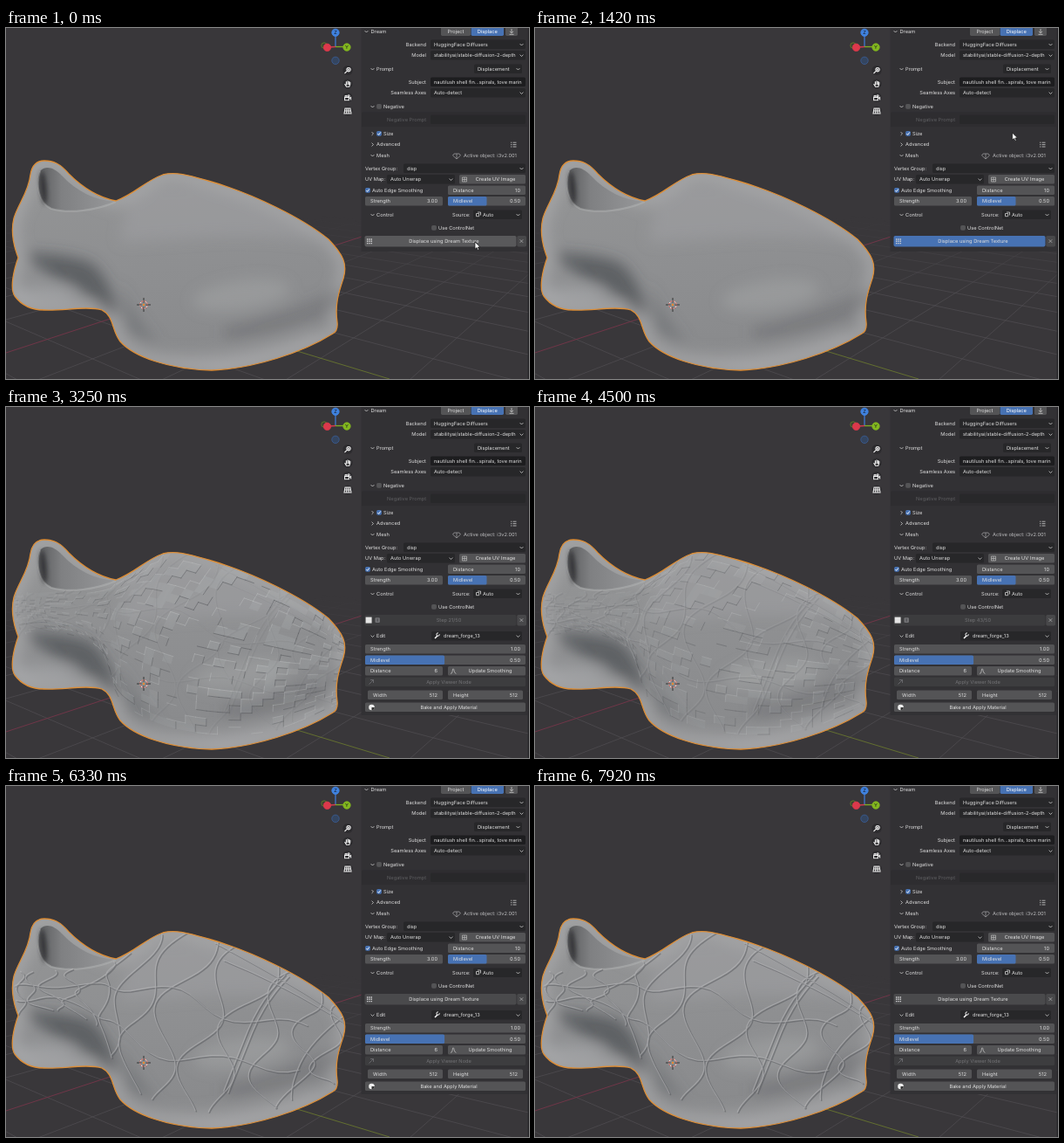
Animation of 600x402 px, one loop 8000 ms. Source, as an HTML page:

```html
<!DOCTYPE html>
<html lang="en">
<head>
<meta charset="utf-8">
<title>Displacement preview</title>
<style>
html, body { margin: 0; width: 100%; height: 100%; overflow: hidden; background: #39373a; }
svg { display: block; width: 600px; height: 402px; }
text { font: 5.7px Inter, "Noto Sans", sans-serif; text-rendering: geometricPrecision; white-space: pre; }
</style>
</head>
<body>
<svg id="stage" viewBox="0 0 600 402" xmlns="http://www.w3.org/2000/svg">
  <defs>
    <linearGradient id="skin" x1=".4" y1="0" x2=".6" y2="1">
      <stop offset="0" stop-color="#939495"/><stop offset=".5" stop-color="#8e8f91"/>
      <stop offset="1" stop-color="#88898b"/>
    </linearGradient>
    <linearGradient id="inside">
      <stop offset="0" stop-color="#58595b"/><stop offset=".3" stop-color="#7f8082"/>
      <stop offset="1" stop-color="#97989a"/>
    </linearGradient>
    <linearGradient id="fog" gradientUnits="userSpaceOnUse" x1="0" y1="215" x2="0" y2="310">
      <stop offset="0" stop-color="#fff" stop-opacity="0"/><stop offset="1" stop-color="#fff"/>
    </linearGradient>
    <radialGradient id="spot" gradientUnits="userSpaceOnUse" cx="265" cy="255" r="270">
      <stop offset=".25" stop-color="#fff"/><stop offset=".5" stop-color="#aaa"/>
      <stop offset="1" stop-color="#555"/>
    </radialGradient>
    <filter id="b3" x="-50%" y="-50%" width="200%" height="200%"><feGaussianBlur stdDeviation="2.5"/></filter>
    <filter id="b8" x="-60%" y="-60%" width="220%" height="220%"><feGaussianBlur stdDeviation="8"/></filter>
    <mask id="fade" maskUnits="userSpaceOnUse" x="0" y="0" width="600" height="402"><rect width="600" height="402" fill="url(#fog)"/></mask>
    <mask id="focus" maskUnits="userSpaceOnUse" x="0" y="0" width="600" height="402"><rect width="600" height="402" fill="url(#spot)"/></mask>
    <path id="shape" d="M44,152C36,152 30,156 28,168C26,188 13,203 9,218C5,234 9,250 14,263C9,277 4,298 10,307C18,318 30,323 44,323C66,324 94,318 110,323C124,330 121,346 131,359C146,376 186,391 236,392C284,390 340,372 375,350Q381,347 380,337C377,316 382,302 387,287C392,270 387,260 370,242C342,219 285,190 232,175C211,169 195,164 180,168C160,175 148,190 126,198C105,194 88,183 72,167C62,155 54,152 44,152Z"/>
    <clipPath id="cut"><use href="#shape"/></clipPath>
    <path id="veins" fill="none"/>
  </defs>

  <rect width="600" height="402" fill="#39373a"/>
  <g mask="url(#fade)"><path id="grid" stroke="#525053" stroke-width=".7" fill="none"/></g>
  <path d="M0,372L408,239" stroke="#76364a" stroke-width=".9"/>
  <path d="M158,317L440,402" stroke="#68752f" stroke-width=".9"/>

  <use href="#shape" fill="url(#skin)"/>
  <g clip-path="url(#cut)">
    <g filter="url(#b8)">
      <use href="#shape" fill="none" stroke="#b4b5b6" stroke-width="13" opacity=".6"/>
      <path d="M18,258Q60,256 96,268Q120,284 128,332L110,322Q92,300 52,284Z" fill="#3f4043" opacity=".6"/>
      <path d="M140,196Q190,160 270,195T360,245Q290,235 220,240T130,245Z" fill="#a5a6a8" opacity=".4"/>
      <ellipse cx="270" cy="306" rx="56" ry="17" fill="#b0b1b3" opacity=".35" transform="rotate(-8 270 306)"/>
      <path d="M250,342Q330,325 388,296V318Q330,350 250,358Z" fill="#55575a" opacity=".3"/>
      <path d="M130,290Q145,330 176,362L140,350Z" fill="#5a5c5f" opacity=".4"/>
      <path d="M150,368Q240,384 350,348L376,352L250,396Z" fill="#b6b7b8" opacity=".4"/>
      <ellipse cx="42" cy="306" rx="40" ry="9" fill="#b0b1b2" opacity=".55"/>
    </g>
    <path d="M40,163C46,157 56,160 64,169C82,188 102,197 126,199C104,209 72,213 52,207C36,200 33,172 40,163Z" fill="url(#inside)"/>
    <path d="M39,164C34,180 37,200 52,207C72,213 104,209 126,199" fill="none" stroke="#b1b2b3" stroke-width="2" opacity=".55"/>
    <ellipse cx="43" cy="183" rx="3.6" ry="19" fill="#353639" filter="url(#b3)" transform="rotate(-5 43 183)"/>
    <g id="bricks" mask="url(#focus)" stroke-linecap="square">
      <path id="faces" fill="#d9dbdc" opacity=".13"/>
      <path id="dark" fill="none" stroke="#44464a" stroke-width="1" opacity=".5"/>
      <path id="light" fill="none" stroke="#d5d7d8" stroke-width=".9" opacity=".4"/>
    </g>
    <g id="leather">
      <use href="#veins" stroke="#4e5054" stroke-width="1.5" opacity=".45" x=".8" y=".9"/>
      <use href="#veins" stroke="#bdbebf" stroke-width="1.1" opacity=".5" x="-.5" y="-.4"/>
    </g>
  </g>
  <use href="#shape" fill="none" stroke="#dc8d36" stroke-width="1.3"/>

  <g fill="none" transform="translate(158 317)">
    <circle r="4.3" stroke="#eee" stroke-width="1"/>
    <circle r="4.3" stroke="#d3392f" stroke-width="1" stroke-dasharray="1.7 1.7"/>
    <path d="M-8,0H-2.5M2.5,0H8M0,-8V-2.5M0,2.5V8" stroke="#2b2b2b" stroke-width=".9"/>
    <circle r="1.2" fill="#ee8b2d"/>
  </g>

  <g id="gizmo"></g>
  <g id="panel"></g>
  <path id="pointer" d="M0,0V8.2L2,6.5L3.4,9.4L4.7,8.8L3.4,6L6,5.8Z" fill="#fff" stroke="#111" stroke-width=".7"/>
</svg>
<script>
const $ = id => document.getElementById(id);
const TEXT = '#dedede', DIM = '#727275', FIELD = '#545456', MENU = '#272729', BLUE = '#4772b3', DEEP = '#1d1d1f';

// Floor grid: two bundles of lines through their vanishing points
const O = [158, 318], VX = [788, 115], VY = [-515, 115];
const along = (v, s) => O.map((o, k) => o + (v[k] - o) * s / (s + 13));
function bundle(base, vanish) {
  let d = '';
  for (let i = -11; i < 60; i++) {
    if (!i) continue;
    const p = along(base, i), q = p.map((c, k) => c + (c - vanish[k]) * 8);
    d += `M${vanish}L${q}`;
  }
  return d;
}
$('grid').setAttribute('d', bundle(VY, VX) + bundle(VX, VY));

// Surface patch spanned between an upper and a lower curve
const UPPER = [[8, 212], [48, 212], [122, 202], [190, 167], [268, 185], [336, 216], [389, 260]];
const LOWER = [[14, 262], [62, 258], [110, 280], [134, 338], [202, 370], [298, 372], [380, 340]];
function spline(pts, u) {
  const n = pts.length - 1, x = Math.min(u * n, n - 1e-6), i = Math.floor(x), f = x - i;
  const at = k => pts[Math.max(0, Math.min(n, k))];
  return [0, 1].map(c => {
    const [a, b, e, g] = [at(i - 1)[c], at(i)[c], at(i + 1)[c], at(i + 2)[c]];
    return b + f / 2 * (e - a + f * (2 * a - 5 * b + 4 * e - g + f * (3 * (b - e) + g - a)));
  });
}
function surface(u, v) {
  u = Math.max(0, Math.min(1, u));
  const a = spline(UPPER, u), b = spline(LOWER, u);
  const bulge = 24 * Math.sin(Math.PI * v) * Math.sin(Math.PI * u);
  return [a[0] + (b[0] - a[0]) * v - bulge, a[1] + (b[1] - a[1]) * v].map(c => c.toFixed(1));
}
const NU = 46, NV = 21, nodes = [];
for (let i = 0; i <= NU; i++) {
  nodes.push([]);
  for (let j = 0; j <= NV; j++) nodes[i].push(surface(i / NU, j / NV));
}
const hash = (a, b) => {
  const s = Math.sin(a * 127.1 + b * 311.7) * 43758.5453;
  return s - Math.floor(s);
};
function height(i, j, step) {
  const r = hash((i + j) >> 1, j >> (i & 4 ? 1 : 0));
  return r + .18 * Math.sin(step * .16 + 20 * hash(j, i));
}
function drawBricks(step) {
  const out = { faces: '', dark: '', light: '' };
  const edge = (d, a, b) => {
    if (Math.abs(d) > .4) out[d > 0 ? 'dark' : 'light'] += `M${a}L${b}`;
  };
  for (let i = 0; i < NU; i++) for (let j = 0; j < NV; j++) {
    const h = height(i, j, step), n = nodes;
    if (h > .75) out.faces += `M${n[i][j]}L${n[i + 1][j]}L${n[i + 1][j + 1]}L${n[i][j + 1]}Z`;
    edge(h - height(i + 1, j, step), n[i + 1][j], n[i + 1][j + 1]);
    edge(h - height(i, j + 1, step), n[i][j + 1], n[i + 1][j + 1]);
  }
  for (const k in out) $(k).setAttribute('d', out[k]);
}

// Leather: neighbouring waves in opposite phase enclose leaf-shaped scales
const trace = f => 'M' + Array.from({ length: 41 }, (_, k) => f(k / 40)).join('L');
let veins = 'M321,216Q292,245 278,280T250,350M325,218Q297,247 283,282T255,352' +
  'M240,180Q300,212 340,236T388,272M250,200Q320,228 386,270M387,264Q350,292 338,318T328,360';
for (let i = 0; i < 14; i++) {
  const mid = .04 + i * .071, phase = i + .25 * hash(i, 3);
  veins += trace(v => surface(mid + .031 * Math.sin(Math.PI * (v * 3.2 + phase)) + .012 * Math.sin(v * 5 + i * 2), v));
}
for (const row of [.36, .68])
  veins += trace(u => surface(u * .9, row + .05 * Math.sin(u * 21 + row * 9)));
$('veins').setAttribute('d', veins);

// Interface pieces
const text = (x, y, s, anchor = 'start', fill = TEXT) =>
  `<text x="${x}" y="${y + 1.95}" text-anchor="${anchor}" fill="${fill}">${s}</text>`;
const box = (x, x2, y, fill, h = 10.6) =>
  `<rect x="${x}" y="${y - h / 2 - .2}" width="${x2 - x}" height="${h}" rx="1.6" fill="${fill}"/>`;
const line = (d, c = '#d0d0d0', w = .8) => `<path d="${d}" fill="none" stroke="${c}" stroke-width="${w}"/>`;
const down = (x, y) => line(`M${x - 1.9},${y - .9}l1.9,1.9l1.9,-1.9`);
const right = (x, y) => line(`M${x - .9},${y - 1.9}l1.9,1.9l-1.9,1.9`);
const menu = (x, x2, y, s, tx = x + 4) => box(x, x2, y, MENU) + text(tx, y, s) + down(x2 - 4.5, y);
const value = (x, x2, y, name, v, part = 0) => box(x, x2, y, FIELD) +
  (part ? box(x, x + (x2 - x) * part, y, BLUE) : '') +
  text(x + 6, y, name) + text(x2 - 6, y, v, 'end');
const button = (x, x2, y, s, fill = FIELD, c = TEXT, tx = (x + x2) / 2) => box(x, x2, y, fill) + text(tx, y, s, 'middle', c);
const check = (x, y, on) => box(x - 2.9, x + 2.9, y, on ? BLUE : FIELD, 5.8) +
  (on ? line(`M${x - 1.6},${y}l1.2,1.4l2.2,-3`, '#fff', .9) : '');
const head = (y, s, open = true) => (open ? down : right)(420.5, y) + text(425, y, s);
const dots = (x, y, c) => {
  let d = '';
  for (let i = 0; i < 9; i++) d += `M${x - 3 + i % 3 * 2.3},${y - 2.6 + Math.floor(i / 3) * 2.3}h1.4`;
  return line(d, c, 1.4);
};

$('panel').innerHTML = `
<rect id="back" x="407.5" width="191" fill="#323134"/><path d="M599.3,0V402" stroke="#242426" stroke-width="1.2"/>` +
  down(413.5, 4) + text(418.5, 4, 'Dream') +
  button(499, 533, 3.8, 'Project') + button(533.6, 571, 3.8, 'Displace', BLUE, '#fff') +
  box(573, 587, 3.8, FIELD) + line('M580,1v4.5M578,3.8l2,2l2,-2M577.5,7.3h5') +
  text(482, 19, 'Backend', 'end') + menu(487, 596, 19, 'HuggingFace Diffusers') +
  text(482, 31.5, 'Model', 'end') + menu(487, 596, 31.5, 'stabilityai/stable-diffusion-2-depth') +
  head(47, 'Prompt') + menu(537, 592, 47, 'Displacement') +
  text(482, 62, 'Subject', 'end') + box(487, 596, 62, DEEP) + text(491, 62, 'nautilush shell fin...spirals, tove marin') +
  text(482, 74.5, 'Seamless Axes', 'end') + menu(487, 596, 74.5, 'Auto-detect') +
  down(420.5, 90) + check(428, 90) + text(433, 90, 'Negative') +
  box(408, 598, 105, '#2e2d30', 17) + text(482, 105, 'Negative Prompt', 'end', '#5e5e61') + box(487, 596, 105, '#28282a') +
  right(420.5, 121) + check(428, 121, true) + text(433, 121, 'Size') +
  head(133.5, 'Advanced', false) + line('M579,131.2h1.3M579,133.6h1.3M579,136h1.3M581.5,131.2h4M581.5,133.6h4M581.5,136h4') +
  head(146, 'Mesh') + line('M514,144h6l1.5,2l-4.5,4l-4.5,-4ZM517,144v6', '#a5a5a7', .7) + text(525, 146, 'Active object: i3v2.001', 'start', '#bdbdbf') +
  text(412, 161, 'Vertex Group:') + menu(456, 596, 161, 'disp') +
  text(412, 173.5, 'UV Map:') + menu(437, 515, 173.5, 'Auto Unwrap') +
  button(520, 596, 173.5, 'Create UV Image', FIELD, TEXT, 561.5) + line('M523.5,171h5v5h-5ZM526,171v5M523.5,173.5h5', '#ccc', .6) +
  check(415, 186, true) + text(420, 186, 'Auto Edge Smoothing') + value(507, 596, 186, 'Distance', '10') +
  value(412, 501, 198.5, 'Strength', '3.00') + value(507, 596, 198.5, 'Midlevel', '0.50', .5) +
  head(214, 'Control') + text(512, 214, 'Source:') + menu(536, 592, 214, 'Auto', 547) +
  line('M539.5,212.5h3.2v3.2h-3.2ZM541,211h3.5v3.5') +
  check(491, 229) + text(496, 229, 'Use ControlNet') +
  `<rect id="run" x="411.5" y="238" width="174" height="12.4" rx="1.8"/>` + box(586.3, 597, 244.4, '#48484a', 12.4) +
  line('M589.6,242.3l3.6,3.6M593.2,242.3l-3.6,3.6', '#b5b5b7', .7) +
  `<g id="ready">${dots(417, 244.6, '#cfcfd1')}</g>
<g id="busy"><rect x="412.6" y="240.6" width="7" height="7" fill="#e4e4e4"/><rect x="423.5" y="241.2" width="5.4" height="5.8" rx="1" fill="${DIM}"/>${line('M426.2,242.4v3.4', '#3c3c3e')}</g>
<text id="label" y="246.2" text-anchor="middle"></text>
<g id="edit">` +
  head(262.5, 'Edit') + menu(488, 592, 262.5, 'dream_forge_13', 502) +
  line('M492,265l3,-3', '#fff', 1.4) + line('M497.3,260.3a1.7,1.7 0 1 1 -1.5,-1.5', '#fff', 1) +
  value(412, 596, 277.5, 'Strength', '1.00') + value(412, 596, 290, 'Midlevel', '0.50', .495) +
  value(412, 501, 302.5, 'Distance', '6') + button(507, 596, 302.5, 'Update Smoothing', FIELD, TEXT, 555.5) +
  line('M510,305.4q2,0 2.2,-3t1,-2.6t1,2.6t2.2,3', '#ccc', .7) +
  button(412, 596, 315, 'Apply Viewer Node', '#3d3d3f', DIM, 508) + line('M416.5,317.5l5,-5M418,312.5h3.5v3.5', DIM) +
  value(415, 501, 330, 'Width', '512') + value(507, 593, 330, 'Height', '512') +
  button(412, 596, 344, 'Bake and Apply Material', FIELD, TEXT, 508) +
  `<circle cx="419.5" cy="344" r="3.3" fill="#eee"/><path d="M419.5,344h3.3a3.3,3.3 0 0 1 -3.3,3.3Z" fill="#333"/></g>`;

const ball = (x, y, fill, stroke, s = '') => `<circle cx="${x}" cy="${y}" r="4.2" fill="${fill}" stroke="${stroke}" stroke-width=".8"/>` +
  (s && text(x, y, s, 'middle', '#16161a'));
const nav = (y, d) => `<circle cx="392" cy="${y}" r="5.6" fill="#2c2b2e"/><g transform="translate(392 ${y})">${line(d, '#eee', 1.1)}</g>`;
$('gizmo').innerHTML = line('M378,21V6', '#3f78d0', 1.3) + line('M378,21.5H390', '#7fae22', 1.3) + line('M378,21.5L369,22', '#d33a4c', 1.3) +
  `<circle cx="365" cy="20" r="3.2" fill="#3c4230" stroke="#66852a" stroke-width=".8"/>` + ball(378, 37.3, '#34455f', '#3a5f98') +
  ball(368.5, 22.3, '#dc394b', '#dc394b') + ball(378, 5.3, '#3f82e0', '#3f82e0', 'Z') + ball(391, 22, '#83b81f', '#83b81f', 'Y') +
  nav(48.5, 'M-3.5,3.5L-.8,.8M1,-3a2.2,2.2 0 1 0 .1,0M1,-2v2.4M-.2,-.8h2.4') +
  nav(64, 'M-3.4,0L-1.5,3.2H1.8L2.8,.2V-2.2M-1.6,1.5V-2.8M0,1V-3.6M1.5,1V-3') +
  nav(79.5, 'M-3.4,0H1.4V3.2H-3.4ZM1.4,1.2L3.6,0V3M-2.2,-2.2h.1a1,1 0 1 0 .1,0M1,-2.8h.1a1,1 0 1 0 .1,0') +
  nav(95, 'M-3,-3H3L4,3H-4ZM-3.5,0H3.5M-1,-3L-1.3,3M1,-3L1.3,3');

// Timeline
const LOOP = 8000, CLICK = 240, START = 1915, DONE = 5170;
const show = (id, on) => $(id).style.display = on ? '' : 'none';
const stepAt = t => Math.min(50, Math.floor(t < 3250 ? 6.01 + (t - 2250) * .015 : 21.01 + (t - 3250) * .0176));
let lastStep = -1;

function render(t) {
  const busy = t >= START && t < DONE, done = t >= DONE, blue = t >= CLICK && t < START;
  const step = busy ? stepAt(t) : 0;
  show('edit', t >= START);
  $('back').setAttribute('height', t >= START ? 353 : 256);
  show('ready', !busy);
  show('busy', busy);
  show('bricks', busy);
  show('leather', busy || done);
  $('run').setAttribute('fill', blue ? BLUE : busy ? '#3c3c3e' : done ? '#4a4a4c' : '#59595b');
  const label = $('label');
  label.textContent = busy ? `Step ${step}/50` : 'Displace using Dream Texture';
  label.setAttribute('x', busy ? 508 : 502.5);
  label.setAttribute('fill', busy ? DIM : TEXT);
  if (busy && step !== lastStep) drawBricks(lastStep = step);
  $('bricks').style.opacity = 1 - step * .009;
  $('leather').style.opacity = done ? 1 : step * .007;

  const k = Math.max(0, Math.min(1, (t - 400) / 650)), e = k * k * (3 - 2 * k);
  show('pointer', t < START);
  $('pointer').setAttribute('transform', `translate(${538 + 9.5 * e} ${245 - 125 * e})`);
}
function frame() {
  render(performance.now() % LOOP);
  requestAnimationFrame(frame);
}
frame();
</script>
</body>
</html>
```
